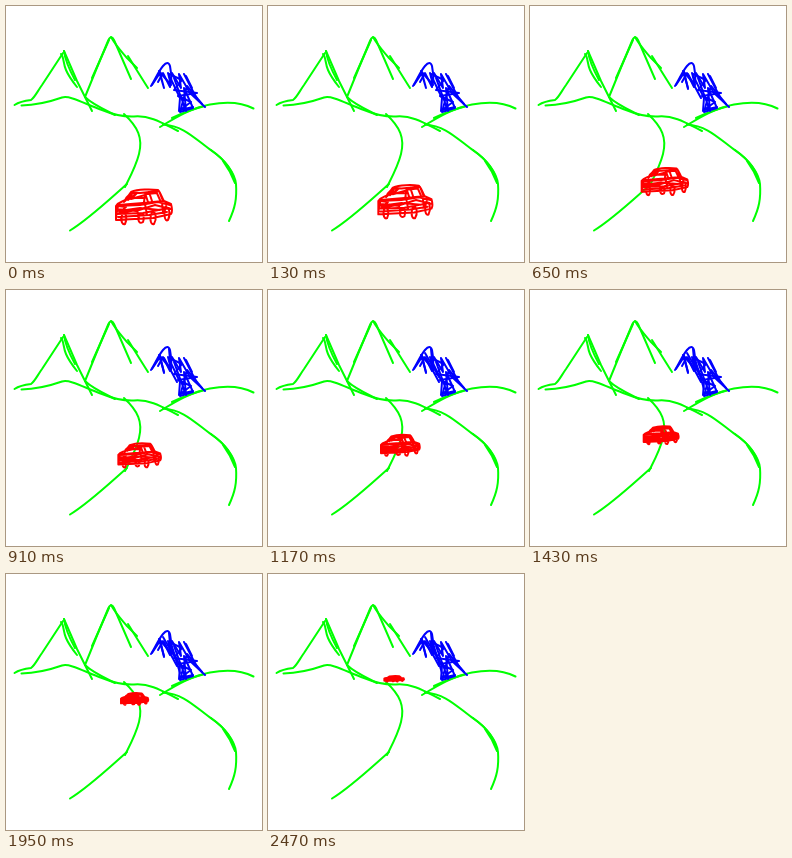
Write an HTML page with a canvas that moves like this. It is 256 px wide and 256 px high and loops after 2.6 s.

```html
<!DOCTYPE html>
<html lang="en">
<head>
<meta charset="utf-8">
<title>Car on a mountain road</title>
<style>
html, body { margin: 0; width: 100%; height: 100%; overflow: hidden; background: #fff; }
canvas { display: block; width: 256px; height: 256px; }
</style>
</head>
<body>
<canvas id="stage" width="256" height="256"></canvas>
<script>
const ctx = document.getElementById('stage').getContext('2d');
const STEP = 130, STEPS = 20;

const land = [
  // left mountain
  'M8.5 99 C13 96 16 95 25 94 C29 91 31 86 36 79 L57 47',
  'M58 45 L71 75 L86 105',
  'M55 48 C58 51 57 57 60 64 C63 71 67 76 71 81',
  'M58 45 C59 54 63 63 69 74',
  // middle mountain
  'M79 91 L90 64 L102 35 Q105 28 108 34 L125 73',
  'M86 72 L103 34',
  'M105 31 C110 40 116 46 121 52 L131 62',
  'M122 50 C127 58 135 71 142 82',
  // foothills
  'M15.5 99.5 C34 99 46 95 56 91.5 C64 89 79 98 96 104 C108 109 116 111 128 110.5 C145 109 158 118 172 125',
  'M79 91 C86 98 97 103 109 109',
  'M154 121 C169 112 185 102 204 98.5 C222 95 237 97 247.5 102.5',
  'M166 112 C176 107 187 103 199 100',
  // road
  'M118 108 C132 121 137 132 133 148 C130 160 125 169 119 181',
  'M121 178 C106 191 83 213 64 224.5',
  'M157 118.5 C178 120 188 132 206 145 C219 154 229 167 230 178 C231 193 229 202 223 215',
  'M205 144 C218 153 227 164 229 177 L224 166 L217 155'
].map(d => new Path2D(d));

const peak = [
  'M145 80 C149 74 152 66 157 60 Q162 54 164 60 L165 67',
  'M146 79 L154 67 L158 82 L153 65 L165 79 L162 67 L174 92 L173 105',
  'M152 76 L157 67 L164 81 L166 67 L175 82 L173 68 L184 87',
  'M163 68 L176 74 L168 84 L191 87 L172 90 L185 96 L174 104 L187 101',
  'M178 68 L191 93 M184 87 L199 101 M180 70 L186 82',
  'M168 72 L180 105 L178 82 L187 102 L174 106 L181 80 L196 98'
].map(d => new Path2D(d));

// extra scribbles arriving one by one
const extras = [
  [2, 'M158 68 L171 92'], [4, 'M154 66 L158 83'],
  [6, 'M163 59 L165 80'], [8, 'M157 63 L171 87'], [10, 'M164 66 L174 99']
].map(([from, d]) => [from, new Path2D(d)]);

const CAR = { x: 109, y: 183, w: 57, h: 35.5 };
const car = new Path2D([
  // body and roof
  'M110 212 L110 200 C113 195 118 196 120 193 L125 186 C132 183 145 183 152 184 C155 187 156 192 158 195 L165 198 Q167 205 165 208 L147 212 L110 214 Z',
  'M118 196 C121 188 127 186 134 187 L153 185 L157 195 L137 197 L112 199',
  // windows
  'M119 195 L126 188 L122 194 L131 187 L125 193 L139 189 L138 196 M121 192 L139 192 M139 187 L142 196',
  'M143 186 L146 195 M150 185 L154 194 M141 188 L151 187',
  // front and sides
  'M111 200 L134 199 L152 196 L164 199 M110 203 L130 205 L149 199 L165 203',
  'M111 208 L137 207 L163 202 M112 211 L143 209 L161 206 M113 205 L134 202 L154 204',
  'M110 211 L112 200 L120 201 L113 207 L131 204 L133 211 M139 198 L141 209 M156 196 L157 207',
  // wheels
  'M116 209 C114 216 117 219 119 218 C121 214 121 207 117 207',
  'M133 208 C131 216 134 218 137 216 C139 212 137 206 134 208',
  'M146 206 C143 214 145 219 148 218 C151 213 150 205 146 206',
  'M160 200 C157 209 159 216 162 214 C165 208 163 199 159 202'
].join(' '));

const mix = (a, b, t) => a + (b - a) * t;

function stroke(path, color) {
  ctx.strokeStyle = color;
  ctx.stroke(path);
}

// shrink the shape but keep the pen width
function carAt(t) {
  const sx = mix(57, 20, t) / CAR.w, sy = mix(35.5, 5.5, t) / CAR.h;
  const x = mix(109, 116, t), y = mix(183, 102, t);
  const path = new Path2D();
  path.addPath(car, new DOMMatrix([sx, 0, 0, sy, x - CAR.x * sx, y - CAR.y * sy]));
  return path;
}

function draw(step) {
  ctx.fillStyle = '#fff';
  ctx.fillRect(0, 0, 256, 256);
  ctx.lineWidth = 2;
  ctx.lineCap = ctx.lineJoin = 'round';
  land.forEach(p => stroke(p, '#0f0'));
  peak.forEach(p => stroke(p, '#00f'));
  for (const [from, p] of extras) if (step >= from) stroke(p, '#00f');
  stroke(carAt(step / (STEPS - 1)), '#f00');
}

const start = performance.now();
function tick() {
  draw(Math.floor((performance.now() - start) / STEP) % STEPS);
  requestAnimationFrame(tick);
}
tick();
</script>
</body>
</html>
```
